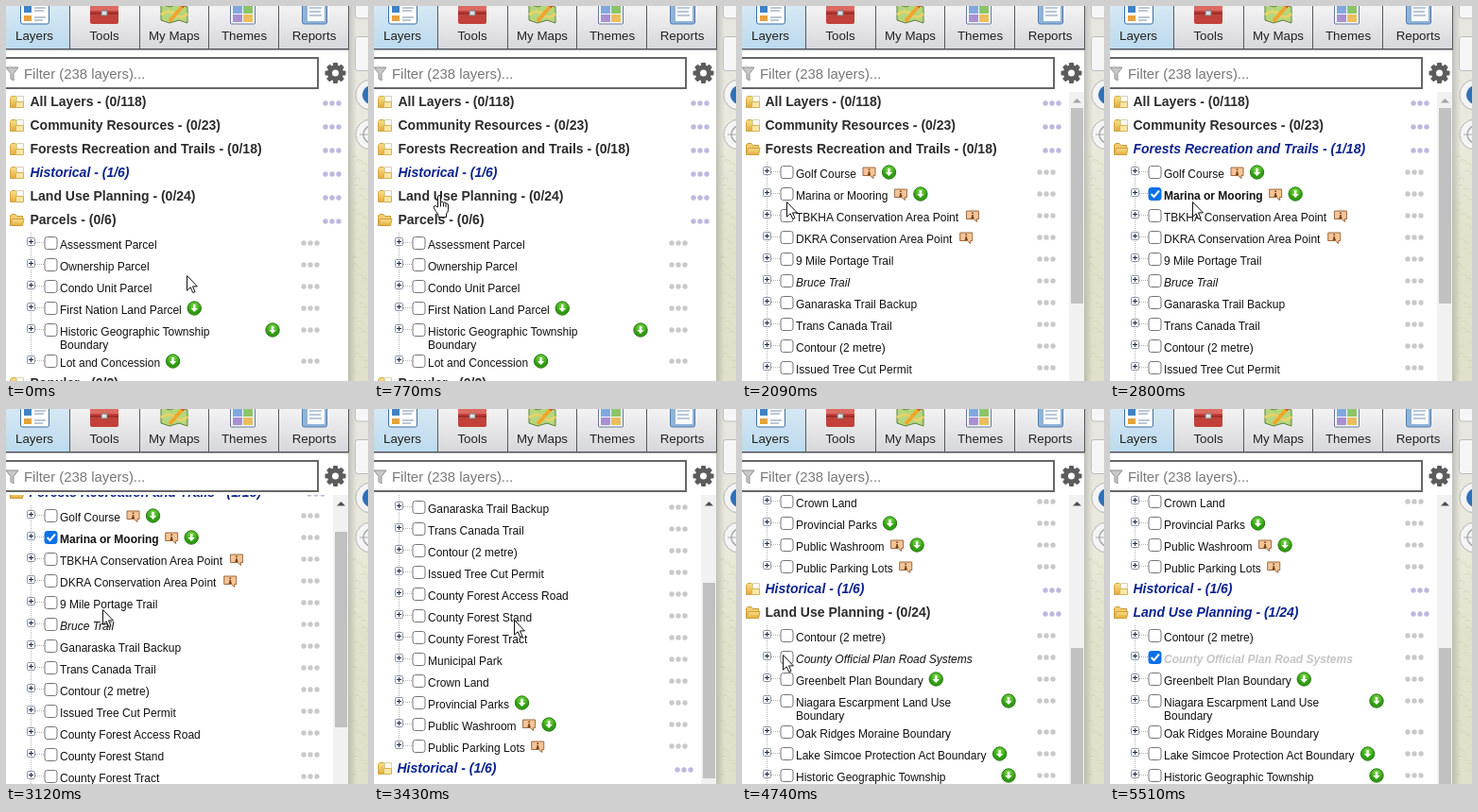
Animation, 383 px wide and 397 px high, one loop 6220 ms. Source, as an HTML page:

```html
<!DOCTYPE html>
<html lang="en">
<head>
<meta charset="utf-8">
<title>Layer list</title>
<style>
  html, body { margin: 0; width: 100%; height: 100%; overflow: hidden; background: #fff; }
  svg { display: block; font-family: "Liberation Sans", Arial, sans-serif; }
  text { white-space: pre; }
  .tab { font-size: 13.33px; text-anchor: middle; fill: #222; }
  .title { font: bold 14px "Liberation Sans", Arial, sans-serif; fill: #2b2b2b; }
  .active { font-style: italic; fill: #0b2390; }
  .row { font-size: 12px; fill: #111; }
  .on { font-weight: bold; }
  .it { font-style: italic; }
  .faded { fill: #c4c4c4; }
</style>
</head>
<body>
<svg id="stage" width="383" height="397" viewBox="0 0 383 397">
  <defs>
    <linearGradient id="tabBg" x2="0" y2="1"><stop stop-color="#f3f3f4"/><stop offset="1" stop-color="#d6d7da"/></linearGradient>
    <linearGradient id="tabOn" x2="0" y2="1"><stop stop-color="#d6e8f5"/><stop offset="1" stop-color="#bbdaee"/></linearGradient>
    <linearGradient id="mapBg" x2="0" y2="1"><stop stop-color="#e6e6e0"/><stop offset=".35" stop-color="#ebe9dc"/><stop offset=".6" stop-color="#e2e2cc"/><stop offset="1" stop-color="#e1e1cb"/></linearGradient>
    <linearGradient id="shade"><stop stop-color="#777" stop-opacity=".35"/><stop offset="1" stop-color="#777" stop-opacity="0"/></linearGradient>
    <radialGradient id="green" cy=".3"><stop stop-color="#7fe04a"/><stop offset="1" stop-color="#2f9a12"/></radialGradient>
    <linearGradient id="gold" x2="0" y2="1"><stop stop-color="#fbe08a"/><stop offset="1" stop-color="#e3ab35"/></linearGradient>
    <clipPath id="listClip"><rect y="91" width="362" height="306"/></clipPath>

    <g id="closed">
      <path d="M.5 12.5V2.5L2 .5H6L7.5 2.5H13.5V12.5Z" fill="url(#gold)" stroke="#d3a746"/>
      <path d="M7.500.5H14.500V8H7.500Z" fill="#fffdf4" stroke="#d9cfae"/>
      <path d="M6.500 6.500H14.500V12.500H6.500Z" fill="#fae6a6" stroke="#d8b053"/>
    </g>
    <g id="open">
      <path d="M.5 12V2L2 .5H6L7.5 2.5H13.5V5" fill="#f2cd6c" stroke="#c99a35"/>
      <path d="M.5 12.5L2.5 5.5H15L13.5 12.5Z" fill="url(#gold)" stroke="#cfa03c"/>
    </g>
    <g id="plus">
      <rect x=".5" y=".5" width="8" height="8" rx="1" fill="#fff" stroke="#8794a8"/>
      <path d="M2 4.5H7M4.5 2V7" stroke="#1c2a4a"/>
    </g>
    <g id="info">
      <path d="M-6.500-5H6.500V3.500H4.500V6.500L1 3.500H-6.500Z" fill="#f5c496" stroke="#9c6a40"/>
      <path d="M0-3.500V-2M0-1V2.500M-1.500 2.200H1.500" stroke="#6b3a12" stroke-width="1.6"/>
    </g>
    <g id="load">
      <circle r="7.2" fill="url(#green)" stroke="#2a7d14"/>
      <path d="M-1.200-4H1.200V0H3.600L0 4-3.600 0H-1.200Z" fill="#fff"/>
    </g>
    <g id="dots"><circle cx="-7" r="2.7"/><circle r="2.7"/><circle cx="7" r="2.7"/></g>
  </defs>

  <rect width="383" height="397" fill="#fff"/>
  <g id="map"></g>
  <g id="tabs"></g>

  <rect x="-2" y="55" width="332" height="32" fill="#fff" stroke="#666" stroke-width="2"/>
  <path d="M0 65H13L8 71.5V79L5 77V71.5Z" fill="#c9c9c9" stroke="#8e8e8e"/>
  <text x="19" y="77" font-size="14.900" fill="#777">Filter (238 layers)...</text>
  <g id="gear" transform="translate(348.5 71)" fill="#5c5c5c"></g>

  <g clip-path="url(#listClip)">
    <g id="list"></g>
    <g id="bar">
      <rect x="346" y="91" width="16" height="306" fill="#f1f1f1"/>
      <path id="up" d="M350 102.5L354.500 98 359 102.500Z"/>
      <rect id="thumb" x="348" width="13" fill="#c1c1c1"/>
    </g>
  </g>

  <g id="cursor" stroke="#111" fill="#fff" stroke-linejoin="round">
    <path id="arrow" d="M.5.5V16.200L4.200 12.800 6.700 18.500 9 17.500 6.500 11.900H11.400Z"/>
    <g id="hand">
      <path d="M-1.500 13V2Q-1.500.5 0 .5T1.500 2V7.500Q3 6.300 4.500 8.200 6 7.200 7 9 9.500 8.300 9.500 11V15.500Q9.500 18.500 7.500 20V23.500H-1V21Q-3.500 17.500-5.800 13.800-6 11.300-3.800 11.500Z"/>
      <path d="M1.500 8V12.500M4.500 8.500V12.500M7 9.500V13" fill="none"/>
    </g>
  </g>
</svg>

<script>
const LOOP = 6220;
const $ = id => document.getElementById(id);
const pen = document.createElement('canvas').getContext('2d');
const use = (id, x, y, extra = '') => `<use href="#${id}" x="${x}" y="${y}" ${extra}/>`;
const rect = (x, y, w, h, fill, extra = '') =>
  `<rect x="${x}" y="${y}" width="${w}" height="${h}" fill="${fill}" ${extra}/>`;

// Row markup: leading "_" italic, "/" line break, then icons: i = info, d = download
const groups = [
  ['All Layers', 118],
  ['Community Resources', 23],
  ['Forests Recreation and Trails', 18, [
    'Golf Course|id', 'Marina or Mooring|id', 'TBKHA Conservation Area Point|i',
    'DKRA Conservation Area Point|i', '9 Mile Portage Trail', '_Bruce Trail',
    'Ganaraska Trail Backup', 'Trans Canada Trail', 'Contour (2 metre)',
    'Issued Tree Cut Permit', 'County Forest Access Road', 'County Forest Stand',
    'County Forest Tract', 'Municipal Park', 'Crown Land', 'Provincial Parks|d',
    'Public Washroom|id', 'Public Parking Lots|i']],
  ['Historical', 6],
  ['Land Use Planning', 24, [
    'Contour (2 metre)', '_County Official Plan Road Systems', 'Greenbelt Plan Boundary|d',
    'Niagara Escarpment Land Use/Boundary|d', 'Oak Ridges Moraine Boundary',
    'Lake Simcoe Protection Act Boundary|d', 'Historic Geographic Township/Boundary|d']],
  ['Parcels', 6, [
    'Assessment Parcel', 'Ownership Parcel', 'Condo Unit Parcel', 'First Nation Land Parcel|d',
    'Historic Geographic Township/Boundary|d', 'Lot and Concession|d']],
  ['Popular', 2]
];

function drawRow(spec, y, checked, bold) {
  const [label, icons = ''] = spec.split('|');
  const italic = label[0] === '_';
  const lines = label.replace('_', '').split('/');
  const cls = `row${italic ? ' it' : ''}${bold ? ' on' : ''}${italic && bold ? ' faded' : ''}`;
  pen.font = `${bold ? 'bold ' : ''}12px "Liberation Sans", Arial, sans-serif`;
  const end = 57 + pen.measureText(lines[0]).width;
  let out = `<path d="M31 ${y - 1.5}H40" stroke="#b4b4b4" stroke-dasharray="1 1"/>`
    + use('plus', 22, y - 7)
    + rect(41, y - 7.5, 13, 13, checked ? '#0b70e8' : '#fff',
           `rx="2.5" stroke="${checked ? '#0b70e8' : '#767676'}"`);
  if (checked) out += `<path d="M43.500 ${y - 1}l3 3 5.500-6.500" fill="none" stroke="#fff" stroke-width="2"/>`;
  lines.forEach((s, i) => out += `<text class="${cls}" x="57" y="${y + 5 + 14 * i}">${s}</text>`);
  [...icons].forEach((c, i) => {
    const x = lines[1] ? 282 : end + 13.5 + 21 * i;
    out += use(c === 'i' ? 'info' : 'load', x, y - 1);
  });
  return out + use('dots', 322, y - 1, 'fill="#c9c9c9"');
}

function drawList({ open, bar, checked = [], bold = checked }) {
  let y = 101, out = '';
  const left = bar ? 24.5 : 25.5, dotsX = bar ? 328 : 345;
  for (const [name, total, rows = []] of groups) {
    const isOpen = open.includes(name);
    const count = name === 'Historical' || rows.some(r => isOpen && bold.includes(r)) ? 1 : 0;
    out += use(isOpen ? 'open' : 'closed', 4, y - 6)
      + `<text class="title${count ? ' active' : ''}" x="${left}" y="${y + 5}">${name} - (${count}/${total})</text>`
      + use('dots', dotsX, y + 2, 'fill="#bdb8e0"');
    if (!isOpen) { y += 25; continue; }
    const top = y + 14;
    let body = '';
    y += 26;
    for (const spec of rows) {
      body += drawRow(spec, y, checked.includes(spec), bold.includes(spec));
      y += spec.includes('/') ? 33 : 23;
    }
    out += `<path d="M26.500 ${top}V${y - 25}" stroke="#b4b4b4" stroke-dasharray="1 1"/>` + body;
    y -= 1;
  }
  return `<g>${out}</g>`;
}

const MARINA = 'Marina or Mooring|id', ROADS = '_County Official Plan Road Systems';
const both = ['Forests Recreation and Trails', 'Land Use Planning'];
const scenes = [
  { at: 0, open: ['Parcels'] },
  { at: 850, open: ['Land Use Planning'], bar: 287 },
  { at: 1640, open: both, bar: 207 },
  { at: 2560, open: both, bar: 207, checked: [MARINA] },
  { at: 4910, open: both, bar: 207, checked: [MARINA, ROADS], bold: [MARINA] },
  { at: 4970, open: both, bar: 207, checked: [MARINA, ROADS] }
];

const scrolls = [[0, 0], [3040, 18], [3120, 63], [3200, 92], [3270, 100], [3350, 135],
  [3430, 210], [3500, 270], [3580, 300], [3730, 316], [3810, 354], [3890, 388], [3970, 400]];

// Pointer moves: start, end, steps, x, y, shape
const moves = [
  [70, 220, 3, 70, 177, 'hand'], [470, 770, 5, 69, 200, 'hand'], [1000, 1320, 5, 83, 153, 'hand'],
  [1640, 2090, 7, 47, 207, 'arrow'], [2170, 2240, 2, 31, 186, 'arrow'], [2410, 2410, 1, 43, 191, 'arrow'],
  [2710, 2950, 4, 102, 212, 'arrow'], [3350, 3580, 4, 163, 227, 'arrow'], [4050, 4280, 4, 70, 232, 'arrow'],
  [4360, 4740, 6, 43, 260, 'arrow'], [5140, 5430, 5, 210, 354, 'arrow'], [5510, 5510, 1, 210, 354, 'none']
];

function pointerAt(t) {
  let x = 191, y = 285, shape = 'arrow';
  for (const [start, end, steps, toX, toY, kind] of moves) {
    if (t < start) break;
    const gap = steps > 1 ? (end - start) / (steps - 1) : 1;
    const k = Math.min(1, (Math.floor((t - start) / gap + 1e-6) + 1) / steps);
    const ease = k * (2 - k);
    x += (toX - x) * ease;
    y += (toY - y) * ease;
    if (kind !== 'hand' || k > 0.5) shape = kind;
  }
  return { x: Math.round(x), y: Math.round(y), shape };
}

function drawTabs() {
  const edges = [0, 68, 142, 215, 289, 363];
  const names = ['Layers', 'Tools', 'My Maps', 'Themes', 'Reports'];
  const centers = [30, 104, 178, 252, 326];
  let out = '';
  names.forEach((name, i) => {
    out += rect(edges[i], 0, edges[i + 1] - edges[i], 46, i ? 'url(#tabBg)' : 'url(#tabOn)')
      + rect(edges[i + 1] - 1, 0, 1, 46, '#56585c')
      + `<text class="tab" x="${centers[i]}" y="36">${name}</text>`;
  });
  out += rect(0, 45, 363, 1.5, '#505256');
  // Layers
  out += rect(15.5, -5, 30, 24, '#fff', 'rx="2" stroke="#3b6fa8"')
    + rect(19, 0, 8, 7, '#3d82c8') + rect(19, 10, 8, 6, '#e8a23a')
    + '<path d="M30 2H42M30 5H40M30 12H42M30 15H39" stroke="#7d8ea2"/>';
  // Tools
  out += rect(89, 0, 30, 19, '#c4403a', 'rx="2"') + rect(89, 0, 30, 5, '#dd6a60')
    + rect(89, 7, 30, 1.5, '#8e2a26') + rect(101, 5, 6, 5, '#e0e0e0', 'stroke="#777"');
  // Maps
  out += '<path d="M164-2L173 1 183-2 192 1V18L183 15 173 18 164 15Z" fill="#b5d77c" stroke="#5f7d3a"/>'
    + '<path d="M164 9Q173 3 179 9T192 8" fill="none" stroke="#e6d36a" stroke-width="3"/>'
    + '<path d="M173 16L187 0" stroke="#f0a52c" stroke-width="4"/><path d="M186 1L190-4" stroke="#d34a3a" stroke-width="4"/>';
  // Themes
  out += rect(237.5, -4, 26, 23, '#f7f8fa', 'rx="1" stroke="#66789a"');
  ['#7fa9dc', '#8cc468', '#a98fd0', '#e8bf5a'].forEach((c, i) =>
    out += rect(240 + (i % 2) * 11, (i >> 1) * 9, 10, 8, c));
  // Reports
  out += rect(313.5, -4, 26, 23, '#8fb4da', 'rx="2" stroke="#4f7aa8"')
    + rect(319, -4, 18, 20, '#f8fafc')
    + '<path d="M321 2H334M321 6H333M321 10H334" stroke="#7f95b0"/>';
  return out;
}

function drawMap() {
  let out = rect(362, 0, 21, 397, 'url(#mapBg)');
  for (let i = 0; i < 45; i++) {
    const x = 366 + (i * 7.3) % 17, y = 160 + (i * 41.7) % 235;
    out += `<path d="M${x} ${y}q3-3 6 1" fill="none" stroke="#d0d3ae" stroke-opacity=".7"/>`;
  }
  out += rect(362, 0, 9, 397, 'url(#shade)')
    + rect(369.5, -6, 20, 19, '#f6f6f6', 'rx="3" stroke="#bbb"')
    + rect(369.5, 32.5, 20, 36, '#f6f6f6', 'rx="3" stroke="#bbb"');
  for (const y of [94, 136]) out += `<circle cx="386" cy="${y}" r="16" fill="#f4f4f4" stroke="#b5b5b5"/>`;
  return out + '<circle cx="387" cy="94" r="10" fill="#2d72b8"/>'
    + '<circle cx="387" cy="136" r="9" fill="none" stroke="#aaa" stroke-width="1.500"/><path d="M374 136H383" stroke="#aaa"/>';
}

function drawGear() {
  let teeth = '';
  for (let a = 0; a < 360; a += 45) teeth += rect(-2.5, -11, 5, 6, '#5c5c5c', `rx="1" transform="rotate(${a})"`);
  return teeth + '<circle r="6" fill="none" stroke="#5c5c5c" stroke-width="5"/>';
}

$('map').innerHTML = drawMap();
$('tabs').innerHTML = drawTabs();
$('gear').innerHTML = drawGear();
$('list').innerHTML = scenes.map(drawList).join('');
const layers = [...$('list').children];
const show = (el, on) => { el.style.display = on ? '' : 'none'; };

function render(t) {
  const current = scenes.findLastIndex(s => t >= s.at);
  const scroll = scrolls.findLast(s => t >= s[0])[1];
  const { bar } = scenes[current];
  layers.forEach((el, i) => show(el, i === current));
  $('list').setAttribute('transform', `translate(0 ${-scroll})`);
  show($('bar'), bar);
  if (bar) {
    $('thumb').setAttribute('y', Math.floor(108 + scroll * 0.363));
    $('thumb').setAttribute('height', bar);
    $('up').setAttribute('fill', scroll ? '#505050' : '#a3a3a3');
  }
  const { x, y, shape } = pointerAt(t);
  $('cursor').setAttribute('transform', `translate(${x} ${y})`);
  show($('arrow'), shape === 'arrow');
  show($('hand'), shape === 'hand');
}

const begin = performance.now();
function tick() {
  render((performance.now() - begin) % LOOP);
  requestAnimationFrame(tick);
}
tick();
</script>
</body>
</html>
```
